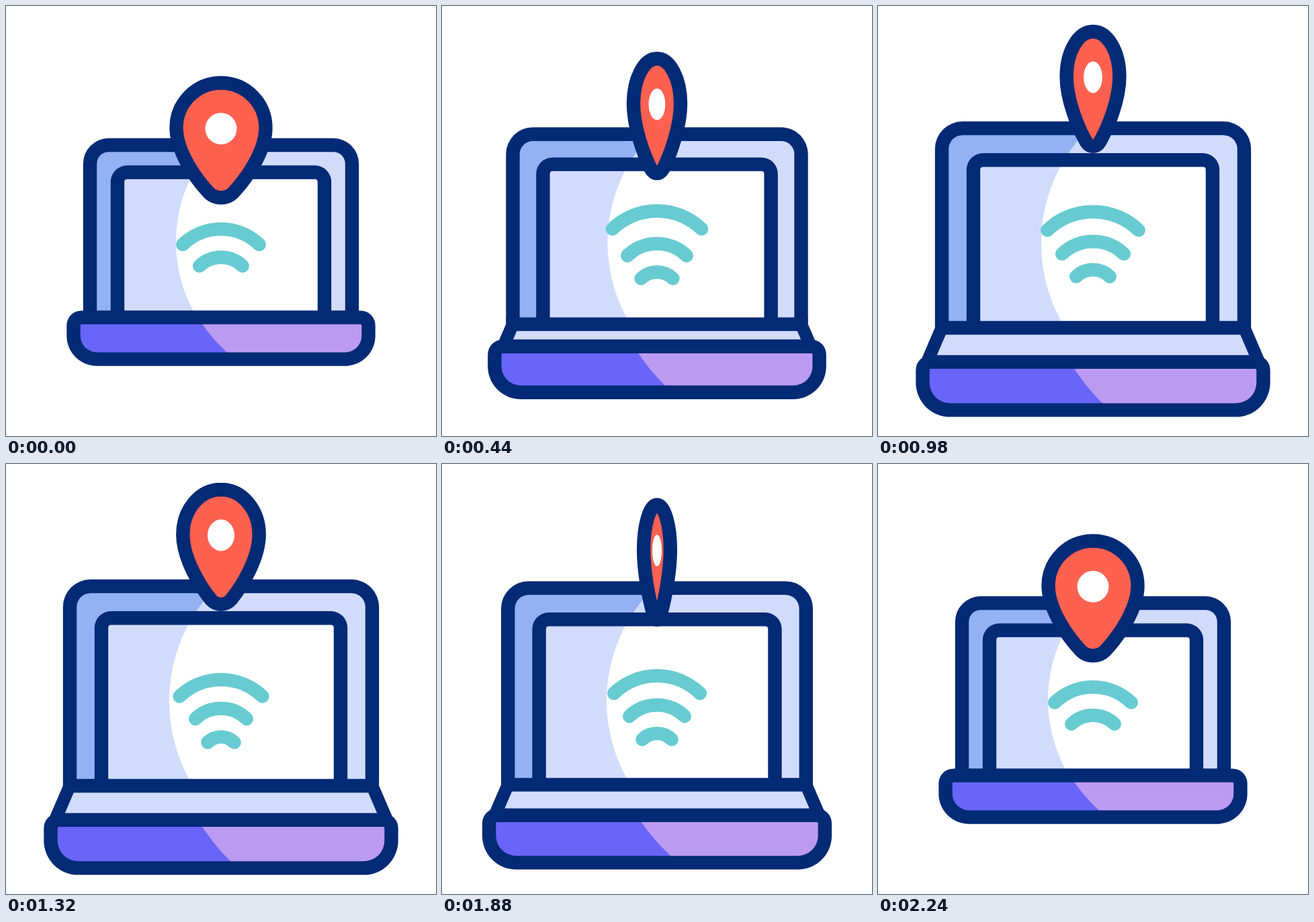
An HTML page without scripts that plays this animation: 640x640 px, repeating every 2.4 s.

```html
<!DOCTYPE html>
<html lang="en">
<head>
<meta charset="utf-8">
<title>Laptop location</title>
<style>
/* Progress values, each animated once and used by every shape below */
@property --open { syntax: "<number>"; inherits: true; initial-value: 0; }
@property --sweep { syntax: "<number>"; inherits: true; initial-value: 0; }
@property --rise { syntax: "<number>"; inherits: true; initial-value: 0; }
@property --turn { syntax: "<number>"; inherits: true; initial-value: 0; }
@property --wave { syntax: "<number>"; inherits: true; initial-value: 0; }
@property --trail { syntax: "<number>"; inherits: true; initial-value: 0; }
@property --reach { syntax: "<number>"; inherits: true; initial-value: 56; }

@keyframes open { 0%, 8.3333%, 91.6667%, 100% { --open: 0; } 25%, 75% { --open: 1; } }
@keyframes sweep {
  0%, 8.3333%, 91.6667%, 100% { --sweep: 0; }
  25% { --sweep: 1; }
  75% { --sweep: 1; animation-timing-function: linear; }
}
@keyframes rise { 0%, 8.3333%, 91.6667%, 100% { --rise: 0; } 29.1667%, 70.8333% { --rise: 1; } }
@keyframes turn { 0%, 8.3333%, 50%, 91.6667%, 100% { --turn: 1; } 29.1667%, 70.8333% { --turn: 0; } }
@keyframes wave {
  0%, 8.3333%, 29.17%, 50.005%, 70.84%, 91.67%, 100% { --wave: 0; }
  29.1667%, 50%, 70.8333%, 91.6667% { --wave: 1; }
}
@keyframes trail { 0%, 29.1667%, 93.3333%, 100% { --trail: 0; } 29.17%, 91.6667% { --trail: 1; } }
@keyframes reach { 0%, 30.9% { --reach: 56; } 31%, 100% { --reach: 46; } }

html, body { margin: 0; width: 100%; height: 100%; overflow: hidden; background: #fff; }
body {
  --navy: #022a75;
  --line: 20.4px;
  --ease: cubic-bezier(.3333, 0, .6667, 1);
  --lid-x: calc(114.8px - 30px * var(--open));
  position: relative;
  animation: 2.4s var(--ease) infinite;
  animation-name: open, sweep, rise, turn, wave, trail, reach;
  animation-timing-function: var(--ease), var(--ease), var(--ease), var(--ease), linear, linear, linear;
}
svg, .box, .hinge, .box::before, .hinge::before { content: ""; position: absolute; inset: 0; }
svg { width: 640px; height: 640px; }

/* Outlined box: navy shape with an inset, two-tone fill */
.box {
  --cx: calc(470px + 15px * var(--sweep));
  --cy: calc(351px + 2px * var(--sweep));
  --cr: calc(217px + 25px * var(--sweep));
  background: var(--navy);
  clip-path: inset(var(--y) var(--x) calc(100% - var(--b)) var(--x)
    round var(--r) var(--r) var(--rb, var(--r)) var(--rb, var(--r)));
}
.box::before {
  --in: calc(var(--x) + var(--line));
  --ri: calc(var(--r) - var(--line));
  --rbi: calc(var(--rb, var(--r)) - var(--line));
  background: radial-gradient(circle at var(--cx) var(--cy),
    var(--light) calc(var(--cr) - .5px), var(--dark) calc(var(--cr) + .5px));
  clip-path: inset(calc(var(--y) + var(--line)) var(--in) calc(100% - var(--b) + var(--line)) var(--in)
    round var(--ri) var(--ri) var(--rbi) var(--rbi));
}
.lid {
  --light: #d1dcfd; --dark: #93b1f3;
  --x: var(--lid-x);
  --y: calc(196.8px - 25px * var(--open));
  --b: calc(495px + 15px * var(--open));
  --r: calc(38px + 3px * var(--open));
}
.screen {
  --light: #fff; --dark: #d1dcfd;
  --x: calc(155.8px - 24px * var(--open));
  --y: calc(237.3px - 18.2px * var(--open));
  --b: calc(495px + 15px * var(--open));
  --r: 24.5px;
}
.base {
  --light: #bb9af2; --dark: #6865f8;
  --x: calc(90.3px - 34px * var(--open));
  --y: calc(453.4px + 66.3px * var(--open));
  --b: calc(535.8px + 75.8px * var(--open));
  --r: 22px;
  --rb: calc(45px + 6px * var(--open));
  --cx: calc(490px + 70px * var(--sweep));
  --cy: calc(337.5px + 27.2px * var(--sweep));
  --cr: calc(240px + 80px * var(--sweep));
}

/* Sloping strip between lid and base */
.hinge {
  --top: calc(453.4px + 15.4px * var(--open));
  --knee: calc(var(--top) + 10px);
  --end: calc(463.6px + 66.3px * var(--open));
  --foot: calc(var(--lid-x) - .43 * (var(--end) - var(--knee)));
  background: var(--navy);
  clip-path: polygon(var(--lid-x) var(--top), var(--lid-x) var(--knee), var(--foot) var(--end),
    calc(100% - var(--foot)) var(--end), calc(100% - var(--lid-x)) var(--knee), calc(100% - var(--lid-x)) var(--top));
}
.hinge::before {
  --a: calc(var(--top) + var(--line));
  --z: max(var(--a), var(--end) - 10.2px);
  --ax: calc(var(--lid-x) + 16px);
  --zx: calc(var(--ax) - .43 * (var(--z) - var(--a)));
  background: #d1dcfd;
  clip-path: polygon(var(--ax) var(--a), var(--zx) var(--z), calc(100% - var(--zx)) var(--z), calc(100% - var(--ax)) var(--a));
}

/* Waves: an arc grows from radius --r by --grow while it climbs by --up */
.arc {
  fill: none; stroke: #67cbd1; stroke-width: 20; stroke-linecap: round;
  vector-effect: non-scaling-stroke;
  transform: translate(320px, calc(var(--y) * 1px - var(--up) * var(--t, var(--wave)) * 1px))
    scale(calc(var(--r) + var(--grow) * var(--t, var(--wave))));
}
.small { --r: 23; --grow: 23; --y: 416.5; --up: 42.5; opacity: calc(var(--wave) * 12.5); }
.mid { --r: 46; --grow: 36; --y: 374; --up: 42; }
.big { --r: 82; --grow: 28; --y: 332; --up: var(--reach); }
.fading { --t: 1; opacity: calc(var(--trail) * (1 - var(--wave) * 12.5)); }

/* Pin: climbs while it spins about its upright axis */
.pin { transform: translate(320px, calc(-76.5px * var(--rise))) scaleX(max(.002, var(--turn))); }
.edge { fill: none; stroke: var(--navy); stroke-width: 20.4; stroke-linejoin: round; vector-effect: non-scaling-stroke; }
</style>
</head>
<body>
<div class="box lid"></div>
<div class="box screen"></div>

<svg viewBox="0 0 640 640" aria-label="Wireless waves">
  <defs><path id="arc" d="M-.695 .281A1 1 0 0 1 .695 .281"/></defs>
  <path class="arc big fading" d="M-.695 .281A1 1 0 0 1 .695 .281"/>
  <path class="arc big" d="M-.695 .281A1 1 0 0 1 .695 .281"/>
  <path class="arc mid" d="M-.695 .281A1 1 0 0 1 .695 .281"/>
  <path class="arc small" d="M-.695 .281A1 1 0 0 1 .695 .281"/>
</svg>

<div class="hinge"></div>
<div class="box base"></div>

<svg viewBox="0 0 640 640" aria-label="Location pin">
  <defs>
    <path id="drop" d="M0 114.5C-37 114.5 -66.5 144.5 -66.5 181.5C-66.5 216 -38 257 -17.5 278.5C-8 287.5 8 287.5 17.5 278.5C38 257 66.5 216 66.5 181.5C66.5 144.5 37 114.5 0 114.5Z"/>
  </defs>
  <g class="pin">
    <use href="#drop" fill="#ff6150"/>
    <circle cy="182.5" r="23.5" fill="#fff"/>
    <use href="#drop" class="edge" style="vector-effect:none;stroke:none"/>
    <path class="edge" d="M0 114.5C-37 114.5 -66.5 144.5 -66.5 181.5C-66.5 216 -38 257 -17.5 278.5C-8 287.5 8 287.5 17.5 278.5C38 257 66.5 216 66.5 181.5C66.5 144.5 37 114.5 0 114.5Z"/>
  </g>
</svg>
</body>
</html>
```
